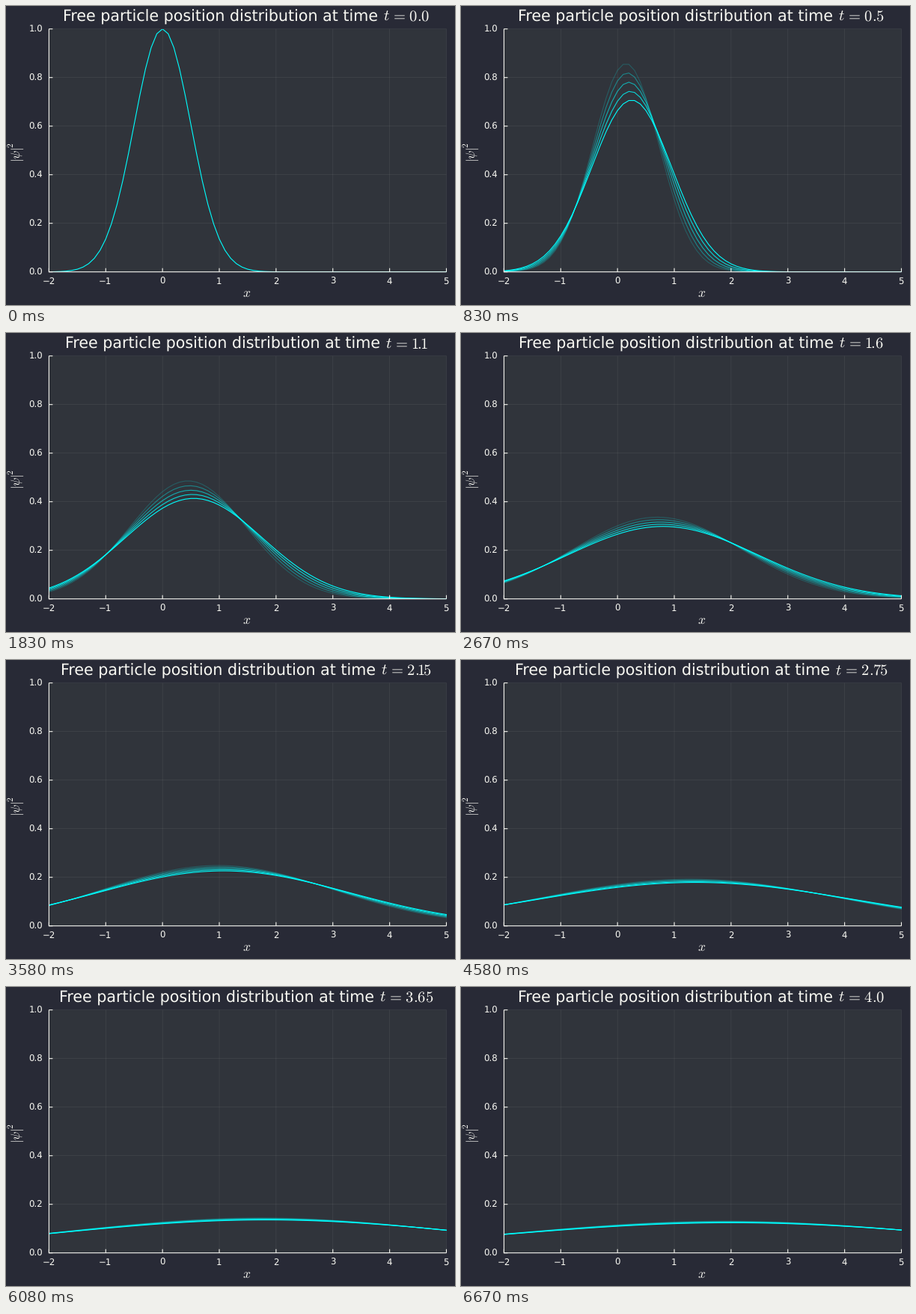
A matplotlib script for the animation above (6760 ms loop, 600 by 400 pixels).

```python
import numpy as np
import matplotlib.pyplot as plt
from matplotlib.animation import FuncAnimation
from matplotlib.patches import Rectangle

DPI = 100
LOOP, SLOT = 6760, 20                # ms
LEFT, RIGHT, TOP, BOTTOM = 57.4, 588.5, 30.7, 355.7
BG, PANEL, FG, CURVE = "#282a36", "#30343b", "#f8f8f2", "#00ffff"
TRAIL = 5
DT = 0.05
TITLE_SIZE, TITLE_MID, TITLE_BASE, TITLE_GAP = 20.6, 321.3, 21, 7

plt.rcParams.update({
    "font.family": "DejaVu Sans",
    "mathtext.fontset": "cm",
    "text.hinting": "none",
    "path.snap": False,
    "toolbar": "None",
})


def pt(px):
    return px * 72 / DPI


def to_x(x):
    return LEFT + (x + 2) / 7 * (RIGHT - LEFT)


def to_y(y):
    return BOTTOM - y * (BOTTOM - TOP)


fig = plt.figure(figsize=(6, 4), dpi=DPI, facecolor=BG)
ax = fig.add_axes([0, 0, 1, 1])
ax.set(xlim=(0, 600), ylim=(400, 0))
ax.axis("off")


def rule(xs, ys, width=1.1, **style):
    return ax.plot(xs, ys, color=FG, lw=pt(width),
                   solid_capstyle="butt", **style)[0]


def label(x, y, text, size, **style):
    return ax.text(x, y, text, fontsize=pt(size), color=FG, **style)


panel = Rectangle((LEFT, TOP), RIGHT - LEFT, BOTTOM - TOP, fc=PANEL, lw=0)
ax.add_patch(panel)

for v in range(-2, 6):
    x = to_x(v)
    rule([x, x], [TOP, BOTTOM], 0.6, alpha=0.1, zorder=1)
    rule([x, x], [BOTTOM, BOTTOM - 5], zorder=5)
    label(x - 0.4, 372, str(v).replace("-", "\u2212"), 11.8, ha="center")

for v in np.linspace(0, 1, 6):
    y = to_y(v)
    rule([LEFT, RIGHT], [y, y], 0.6, alpha=0.1, zorder=1)
    rule([LEFT, LEFT + 5], [y, y], zorder=5)
    label(49, y + 4.4, f"{v:.1f}", 11.8, ha="right")

rule([LEFT, LEFT], [TOP, BOTTOM + 0.5], zorder=5)
rule([LEFT, RIGHT], [BOTTOM, BOTTOM], zorder=5)

upright = dict(ha="center", va="center", rotation=90)
label(322, 388.5, "$x$", 17.5, ha="center")
label(15.8, 198.3, r"$|\psi|$", 17, **upright)
label(6.6, 186.5, "$2$", 11.6, **upright)

body = label(76, TITLE_BASE, "Free particle position distribution at time",
             TITLE_SIZE)
clock = label(506, TITLE_BASE, "", TITLE_SIZE)
body_width = body.get_window_extent().width

grid = np.linspace(-2, 5, 71)
waves = [ax.plot([], [], color=CURVE, lw=pt(1.1), alpha=(n + 1) / TRAIL,
                 zorder=3)[0] for n in range(TRAIL)]
for wave in waves:
    wave.set_clip_path(panel)


def density(x, t):
    spread = 1 + 4 * t * t
    return np.exp(-2 * (x - t / 2) ** 2 / spread) / np.sqrt(spread)


def kerned(number):
    """Tighten the pairs around 1 and after 7."""
    out = number[0]
    for a, b in zip(number, number[1:]):
        kern = 0.13 if "1" in (a, b) else 0.11 if a == "7" else 0
        # mathtext pads a point by 0.2 once a command stands next to it
        kern += 0.2 if a == "." else 0
        out += rf"\hspace{{-{kern:.3f}}}{b}"
    return out


def clock_text(t):
    gap = r"\hspace{0.116}"
    return f"$t{gap}={gap}{kerned(str(round(t, 2)))}$"


starts = np.round(np.arange(81) * 25 / 3) * 10


def update(slot):
    step = int(np.searchsorted(starts, (slot + 0.5) * SLOT, side="right")) - 1
    for n, wave in enumerate(waves):
        k = step - (TRAIL - 1 - n)
        wave.set_visible(k >= 0)
        if k >= 0:
            wave.set_data(to_x(grid), to_y(density(grid, k * DT)))

    clock.set_text(clock_text(step * DT))
    total = body_width + TITLE_GAP + clock.get_window_extent().width
    left = TITLE_MID - total / 2
    body.set_x(left)
    clock.set_x(left + body_width + TITLE_GAP)
    return [*waves, body, clock]


anim = FuncAnimation(fig, update, frames=LOOP // SLOT, interval=SLOT,
                     repeat=True, repeat_delay=0, blit=False)
plt.show()
```
